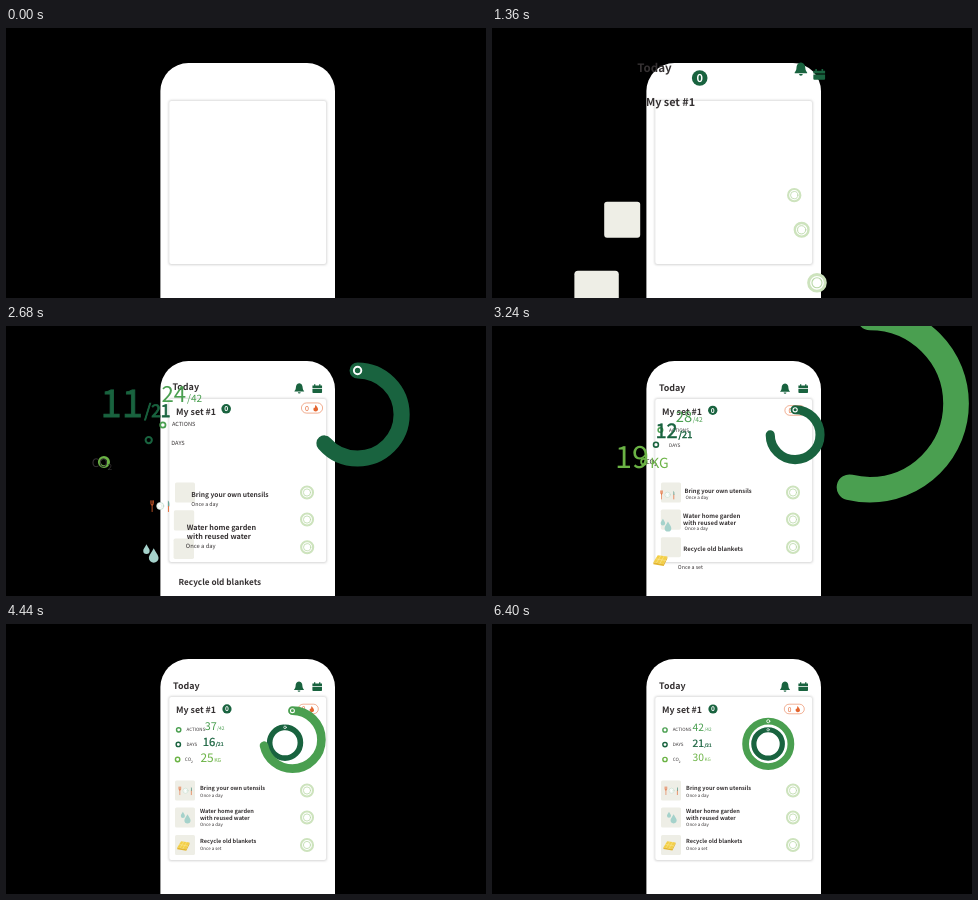
An HTML page for the animation above (8 s loop, 480 by 270 pixels).

```html
<!DOCTYPE html>
<html lang="en">
<head>
<meta charset="utf-8">
<title>Today</title>
<style>
  html, body { margin: 0; width: 100%; height: 100%; overflow: hidden; background: #000; }
  svg { display: block; width: 100%; height: 100%; }
  text {
    font-family: "Noto Sans CJK JP", "Noto Sans CJK SC", "Noto Sans CJK", "Noto Sans", sans-serif;
    text-rendering: geometricPrecision;
    white-space: pre;
  }
</style>
</head>
<body>
<svg viewBox="0 0 480 270" xmlns="http://www.w3.org/2000/svg">
  <defs>
    <filter id="soft" x="-10%" y="-10%" width="120%" height="120%"><feGaussianBlur stdDeviation="1"/></filter>
  </defs>
  <rect width="480" height="270" fill="#000"/>
  <rect x="154.4" y="35.1" width="174.6" height="300" rx="28" fill="#fff"/>
  <rect x="162.6" y="72.2" width="158.2" height="164.8" rx="2.5" fill="#d4d4d4" filter="url(#soft)"/>
  <rect x="163.3" y="72.9" width="156.8" height="163.2" rx="2" fill="#fff"/>
  <g id="layers"></g>
</svg>
<script>
const LOOP = 8000, STEP = 40, START = 520, END = 6400;
const CX = 240, CY = 135;
const INK = '#353132', DARK = '#19633f', MID = '#4a9f50', LIME = '#6bb345', ORANGE = '#e4652f', PALE = '#cde3bd';

const root = document.getElementById('layers');
const layers = [];

// Each layer zooms down onto its place around the stage centre:
// at time t its extra scale is `extra`, decaying at `rate` per second.
function layer(t, extra, rate, markup, from = START) {
  const el = document.createElementNS('http://www.w3.org/2000/svg', 'g');
  el.innerHTML = markup;
  root.appendChild(el);
  layers.push({ el, t, extra, rate, from });
  return el;
}

const text = (x, y, size, weight, str, fill = INK, more = '') =>
  `<text x="${x}" y="${y}" font-size="${size}" font-weight="${weight}" fill="${fill}" ${more}>${str}</text>`;
const circle = (x, y, r, fill, more = '') => `<circle cx="${x}" cy="${y}" r="${r}" fill="${fill}" ${more}/>`;
const path = (d, fill, more = '') => `<path d="${d}" fill="${fill}" ${more}/>`;
const line = (color, width) => `stroke="${color}" stroke-width="${width}" stroke-linecap="round"`;

const tile = y => `<rect x="169" y="${y - 10}" width="20" height="20" rx="1.6" fill="#eeeee6"/>`;
const check = y => circle(301, y, 6, '#fff', line(PALE, 2.1)) + circle(301, y, 3.6, '#fff', line('#b9d8a8', .8));
const dot = (y, color) => circle(173, y, 2.15, 'none', line(color, 1.4));
const label = (y, str) => text(180.7, y, 4.5, 500, str);
const title = (y, str) => text(194.1, y, 5.6, 700, str);
const note = (y, str) => text(194.1, y, 4.45, 500, str);
const drop = (x, y, h) => path(
  `M${x} ${y - h / 2}C${x + h * .15} ${y - h * .2} ${x + h * .34} ${y} ${x + h * .34} ${y + h * .18}` +
  `A${h * .34} ${h * .34} 0 0 1 ${x - h * .34} ${y + h * .18}C${x - h * .34} ${y} ${x - h * .15} ${y - h * .2} ${x} ${y - h / 2}Z`,
  '#a5d2cb');

// header
layer(1360, .30, 2.6, text(167.1, 64.7, 8.9, 700, 'Today'));
layer(1360, .30, 3.1,
  path('M293 57.6C295.6 57.9 296.3 59.9 296.4 62C296.5 63.7 297 64.4 297.8 65.3V65.9H288.2V65.3C289 64.4 289.5 63.7 289.6 62C289.7 59.9 290.4 57.9 293 57.6Z', DARK) +
  path('M291.6 66.5H294.4A1.4 1.3 0 0 1 291.6 66.5Z', DARK));
layer(1360, .225, 4.4,
  path('M306.4 59.6H308V58.2H309.3V59.6H313.1V58.2H314.4V59.6H316V62H306.4Z', DARK) +
  path('M306.4 62.7H316V66.2Q316 67 315.2 67H307.2Q306.4 67 306.4 66.2Z', DARK));
layer(1360, .23, 4.6, text(170, 88.7, 8.8, 700, 'My set #1'));
layer(1360, .70, 2.1, circle(221, 85, 4.6, DARK) + text(221, 87.4, 6.5, 700, '0', '#fff', 'text-anchor="middle"'));
layer(2040, .40, 2.97,
  `<rect x="292.3" y="80.2" width="20" height="9.6" rx="4.8" fill="none" stroke="${ORANGE}" stroke-width=".5"/>` +
  text(297.6, 87.5, 6.6, 500, '0', ORANGE, 'text-anchor="middle"') +
  path('M305.8 82C306.1 83.5 308 84.4 308 86.2C308 87.5 307 88.2 305.8 88.2C304.6 88.2 303.6 87.4 303.6 86.1C303.6 85.2 304 84.6 304.4 84.2C304.5 84.8 304.8 85 305.1 85.1C304.9 84 305.2 82.7 305.8 82Z', ORANGE));

// task rows
layer(1360, .80, 5.7, tile(166.5));
layer(1360, 1.22, 3.3, tile(193.5));
layer(2040, .27, 4.07, tile(221));
layer(1360, .02, 6, check(166.5));
layer(1360, .142, 3.9, check(193.5));
layer(1360, .393, 3.8, check(221));

layer(2680, .42, 3.3,
  path('M173.9 166V170.6M173 163V165Q173 166 173.9 166Q174.8 166 174.8 165V163M173.9 163V166', 'none', line(ORANGE, .55)) +
  circle(179.6, 166.7, 2.5, '#fff', line('#b9d7c5', .5)) + circle(179.6, 166.7, 1.3, '#fff', line('#d6e6d8', .3)) +
  path('M185 162.8Q186.3 163.6 186 167H185Z', '#6fa596') + path('M185.4 167V170.6', 'none', line(ORANGE, .65)));
layer(2680, .58, 3.2, drop(177, 190.7, 6) + drop(181.6, 194.7, 9));
layer(3040, .30, 3.6,
  path('M175.2 217.2L183.6 218.4L180.2 225L171.4 223.4Z', '#f3cf47') +
  path('M171.4 223.4L180.2 225L183.6 218.4V220L180.4 226.6L171.4 225Z', '#e4b62f') +
  path('M177.8 217.8L174.2 223.7M180.6 218.2L177.2 224.2M173.6 220.4L181.8 221.8', 'none', line('#fbe89b', .5)));

layer(2040, 1.335, 3.04, title(165.5, 'Bring your own utensils'));
layer(2680, .19, 4.6, note(172.5, 'Once a day'));
layer(2040, 1.60, 2.67, title(188.5, 'Water home garden') + title(195.5, 'with reused water'));
layer(2680, .31, 4, note(201.6, 'Once a day'));
layer(2680, .47, 3.6, title(219.3, 'Recycle old blankets'));
layer(3040, .40, 4, note(226.3, 'Once a set'));

// legend
layer(2040, 1.01, 2.24, dot(106, MID));
layer(2040, 1.80, 2.16, dot(120.6, DARK));
layer(2680, 1.12, 2.27, dot(135.5, LIME));
layer(2040, 1.26, 2.53, label(107.2, 'ACTIONS'));
layer(2040, 1.36, 2.58, label(122.2, 'DAYS'));
layer(2680, 1.60, 2.23, label(137.2, 'CO<tspan dy="1.3" font-size="3.2">2</tspan>'));

// counters
function counter(t, extra, rate, from, y, color, outline, unit, value) {
  const el = layer(t, extra, rate,
    text(200.7, y, 10.3, 500, `<tspan></tspan><tspan dx=".4" font-size="4.7">${unit}</tspan>`, color, line(color, outline)), from);
  return { node: el.querySelector('tspan'), value };
}
const counters = [
  counter(2680, 1.15, 1.76, 2200, 107.5, MID, 0, '/42', t => Math.min(42, 24.3 + (t - 2680) * .0077)),
  counter(2680, 2.70, 1.87, 2200, 123, DARK, .22, '/21', t => Math.min(21, 11.4 + (t - 2680) * .0028)),
  counter(3840, .56, 2.1, 3000, 137.3, LIME, 0, 'KG', t => Math.min(30, 22.4 + (t - 3840) * .0055))
];

// progress rings
function ring(t, extra, rate, from, r, width, color, degrees) {
  const el = layer(t, extra, rate,
    circle(276, 120, r, 'none',
      `stroke="${color}" stroke-width="${width}" stroke-linecap="round" pathLength="360" transform="rotate(-90 276 120)"`) +
    circle(276, 120 - r, width * .23, color, line('#fff', width * .12)), from);
  return { arc: el.firstChild, degrees };
}
const rings = [
  ring(2680, 2.10, 1.83, 2200, 14.2, 5.2, DARK, t => 230 + (t - 2680) * .0707),
  ring(3840, .905, 1.9, 3000, 22.5, 6.7, MID, t => 227 + (t - 3840) * .0539)
];

function draw(now) {
  const t = Math.min(END, Math.floor((now % LOOP) / STEP) * STEP);
  for (const l of layers) {
    const shown = t >= l.from;
    l.el.style.display = shown ? '' : 'none';
    if (!shown) continue;
    const s = 1 + l.extra * Math.exp(-l.rate * (t - l.t) / 1000);
    l.el.setAttribute('transform', `translate(${CX} ${CY}) scale(${s.toFixed(4)}) translate(${-CX} ${-CY})`);
  }
  for (const c of counters) c.node.textContent = Math.max(0, Math.floor(c.value(t)));
  for (const r of rings) {
    const d = Math.max(0, Math.min(360, r.degrees(t)));
    r.arc.setAttribute('stroke-dasharray', d >= 360 ? 'none' : `${d.toFixed(2)} 400`);
  }
}

const begin = performance.now();
function tick() {
  draw(performance.now() - begin);
  requestAnimationFrame(tick);
}
tick();
</script>
</body>
</html>
```
